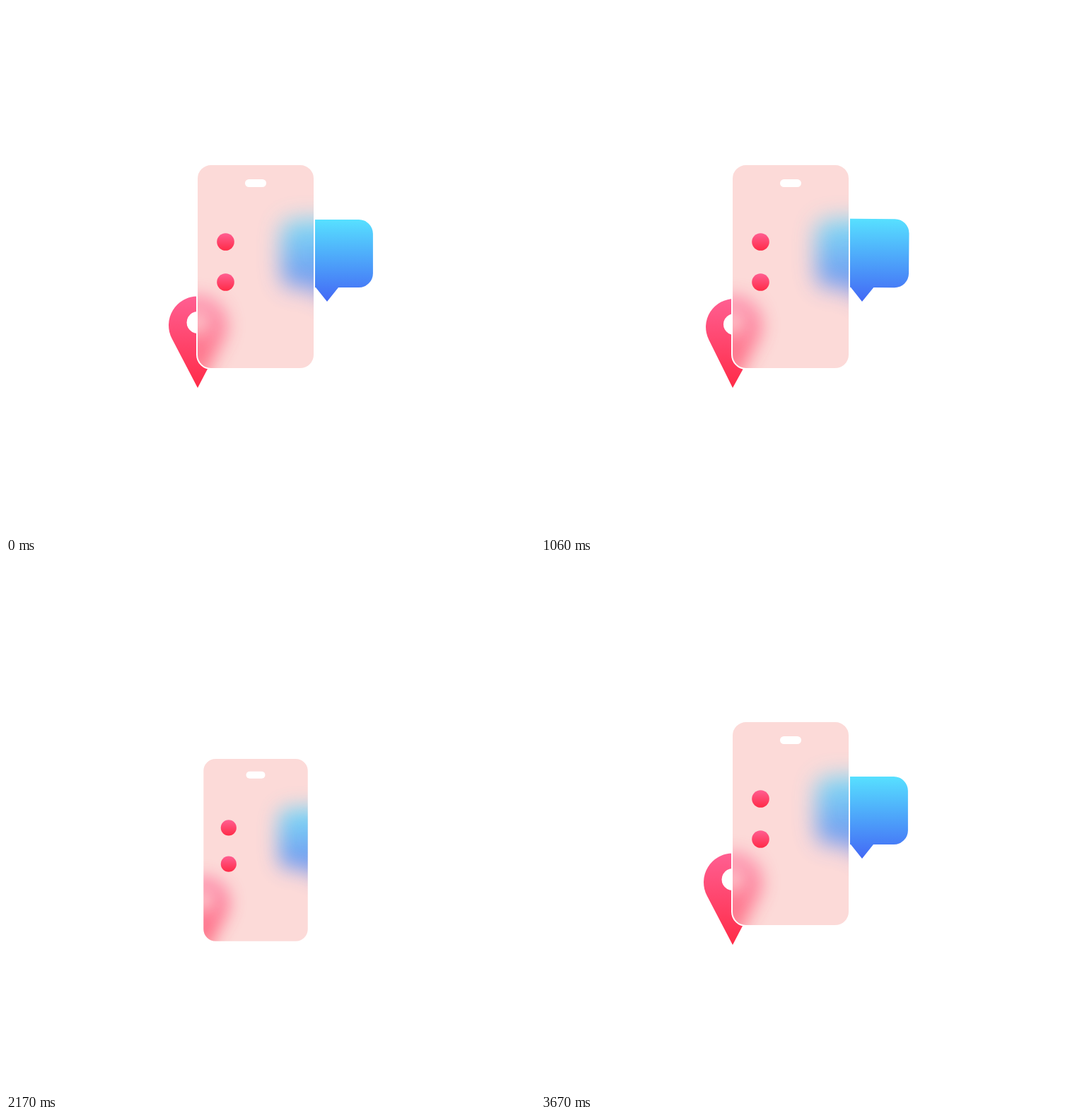
Animation, 748 px wide and 748 px high, one loop 3700 ms. Source, as an HTML page:

```html
<!DOCTYPE html>
<html lang="en">
<head>
<meta charset="utf-8">
<title>Glass phone icon</title>
<style>
  html, body { margin: 0; height: 100%; overflow: hidden; background: #fff; }
  svg { display: block; width: 100%; height: 100%; }
</style>
</head>
<body>
<svg viewBox="0 0 748 748">
  <defs>
    <linearGradient id="red" x2="0" y2="1">
      <stop stop-color="#ff5f92"/>
      <stop offset="1" stop-color="#ff2b47"/>
    </linearGradient>
    <linearGradient id="blue" x2="0" y2="1">
      <stop stop-color="#57e0ff"/>
      <stop offset="1" stop-color="#4368f5"/>
    </linearGradient>
    <filter id="softRed" x="-1" y="-1" width="3" height="3"><feGaussianBlur stdDeviation="13"/></filter>
    <filter id="softBlue" x="-1" y="-1" width="3" height="3"><feGaussianBlur stdDeviation="16"/></filter>
    <clipPath id="screen"><rect x="271" y="225" width="164" height="287" rx="19"/></clipPath>
    <path id="pinShape" fill="url(#red)" fill-rule="evenodd"
      d="M271 540L234.7 470.5A41 41 0 1 1 307.3 470.5ZM271 432a15.5 15.5 0 1 0 .01 0Z"/>
    <path id="bubbleShape" fill="url(#blue)"
      d="M409 302H499a20 20 0 0 1 20 20V378a20 20 0 0 1-20 20H470L454 418L438 398H409a20 20 0 0 1-20-20V322a20 20 0 0 1 20-20Z"/>
  </defs>
  <g id="scene">
    <use id="pin" href="#pinShape"/>
    <use id="bubble" href="#bubbleShape"/>
    <rect x="270" y="224" width="166" height="289" rx="20" fill="#fcdad8" stroke="#fff" stroke-width="2"/>
    <g clip-path="url(#screen)">
      <use href="#pinShape" filter="url(#softRed)" opacity=".65"/>
      <use href="#bubbleShape" filter="url(#softBlue)" opacity=".77"/>
    </g>
    <rect x="338" y="245" width="30" height="11" rx="5.5" fill="#fff"/>
    <circle cx="310.5" cy="333.5" r="12.3" fill="url(#red)"/>
    <circle cx="310.5" cy="390.5" r="12.3" fill="url(#red)"/>
  </g>
</svg>
<script>
  const HOLD = 100, CYCLE = 1800, LOOP = HOLD + 2 * CYCLE, STEP = 30;
  const SPEED = 0.0095, TILT = 46;
  const [scene, pin, bubble] = ['scene', 'pin', 'bubble'].map(id => document.getElementById(id));

  // Damped spring from 0 to 1
  function spring(time, damping) {
    const phase = Math.max(0, time) * SPEED;
    return 1 - Math.exp(-damping * phase) * (Math.cos(phase) + damping * Math.sin(phase));
  }

  // Scale and turn around a fixed point
  function pose(part, x, y, scale, angle = 0) {
    part.setAttribute('transform',
      `translate(${x} ${y}) rotate(${angle}) scale(${scale}) translate(${-x} ${-y})`);
  }

  function draw(now) {
    const t = now % LOOP;
    const time = t < HOLD ? CYCLE : Math.floor((t - HOLD) % CYCLE / STEP) * STEP;
    const pinScale = spring(time - 291, 0.57);
    const bubbleScale = spring(time - 427, 0.56);
    pose(scene, 353, 738, spring(time - 74, 0.662));
    pose(pin, 271, 540, pinScale, TILT * (1 - pinScale));
    pose(bubble, 454, 418, bubbleScale, TILT * (bubbleScale - 1));
  }

  const start = performance.now();
  function tick() {
    draw(performance.now() - start);
    requestAnimationFrame(tick);
  }
  tick();
</script>
</body>
</html>
```
